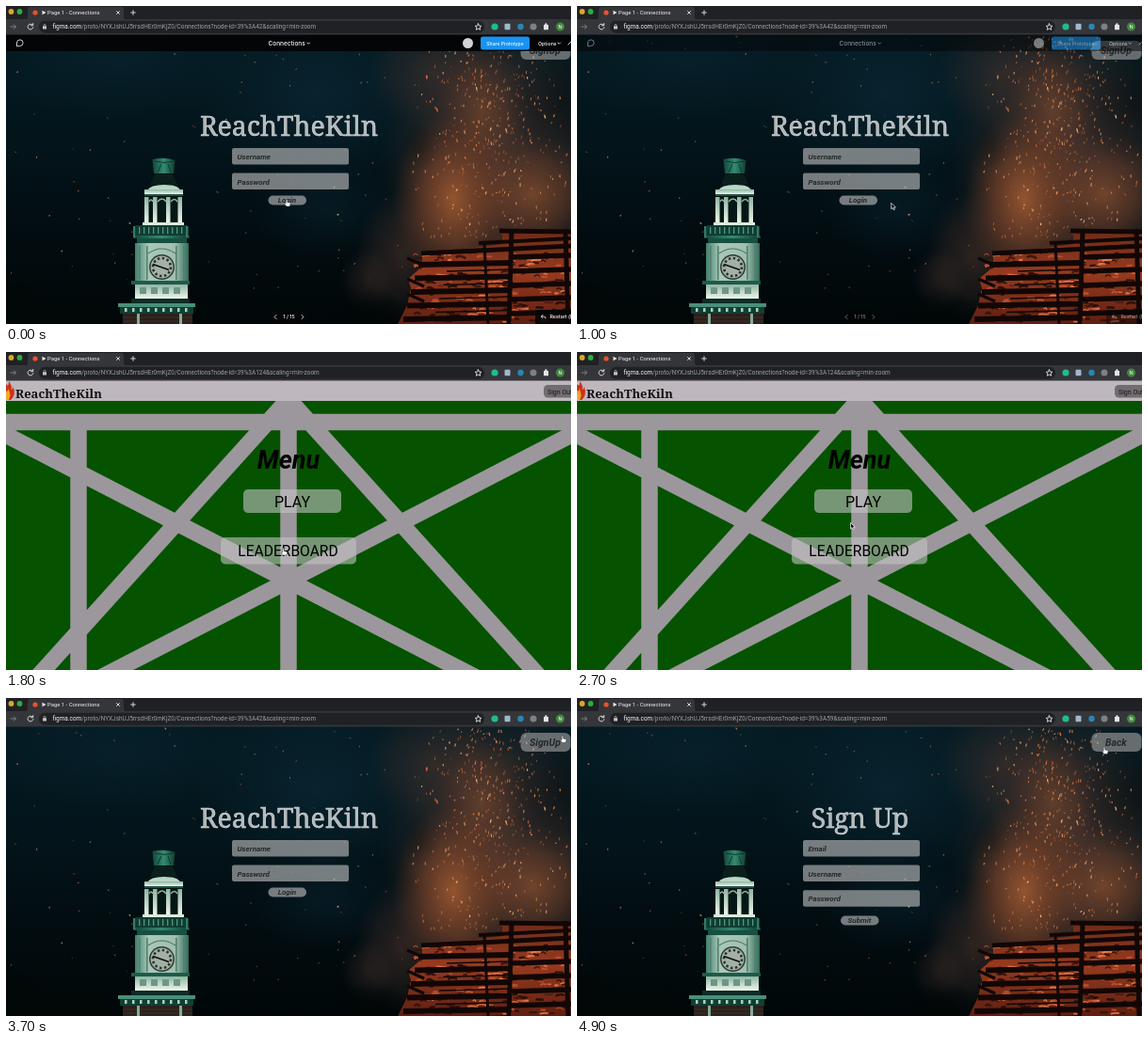
Animation, 600 px wide and 338 px high, one loop 5000 ms. Source, as an HTML page:

```html
<!DOCTYPE html>
<html lang="en">
<head>
<meta charset="utf-8">
<title>Prototype walkthrough</title>
<style>
  html, body { margin: 0; width: 100%; height: 100%; overflow: hidden; background: #000; }
  svg { display: block; width: 100vw; height: 100vh; }
  text { font-family: Roboto, sans-serif; }
  .title { font: 400 28.5px "Noto Serif", serif; fill: #ffffffb0; stroke: #f2f4f2; stroke-width: .45; text-anchor: middle; }
  .bi { font-weight: 700; font-style: italic; fill: #262829; }
  .mid { text-anchor: middle; }
  .box { fill: #c4c4c4; fill-opacity: .6; }
  .corner { fill: #b4b4b4; fill-opacity: .54; }
  .bar { font: 500 6px Inter, sans-serif; fill: #fff; }
  .line { fill: none; stroke: #e4e6e8; stroke-width: .9; stroke-linecap: round; stroke-linejoin: round; }
</style>
</head>
<body>
<svg viewBox="0 0 600 338" preserveAspectRatio="none">
  <defs>
    <linearGradient id="sky" x2="0" y2="1">
      <stop offset="0" stop-color="#041a22"/><stop offset=".4" stop-color="#03141a"/>
      <stop offset=".7" stop-color="#020c10"/><stop offset="1" stop-color="#010708"/>
    </linearGradient>
    <radialGradient id="haze">
      <stop offset="0" stop-color="#0d2f40" stop-opacity=".7"/><stop offset="1" stop-color="#0d2f40" stop-opacity="0"/>
    </radialGradient>
    <radialGradient id="ember">
      <stop offset="0" stop-color="#a05a30" stop-opacity=".9"/><stop offset=".5" stop-color="#84472a" stop-opacity=".55"/>
      <stop offset="1" stop-color="#60341f" stop-opacity="0"/>
    </radialGradient>
    <radialGradient id="smoke">
      <stop offset="0" stop-color="#553a31" stop-opacity=".85"/><stop offset=".6" stop-color="#44322e" stop-opacity=".5"/>
      <stop offset="1" stop-color="#2a2828" stop-opacity="0"/>
    </radialGradient>
    <radialGradient id="dark">
      <stop offset="0" stop-color="#020607" stop-opacity=".8"/><stop offset="1" stop-color="#020607" stop-opacity="0"/>
    </radialGradient>
    <linearGradient id="fire" x2="0" y2="1">
      <stop offset="0" stop-color="#6e2c18"/><stop offset=".45" stop-color="#963a1f"/><stop offset="1" stop-color="#5e1f11"/>
    </linearGradient>
    <linearGradient id="stone">
      <stop offset="0" stop-color="#3f7f6b"/><stop offset=".25" stop-color="#a9c8b8"/>
      <stop offset=".75" stop-color="#a0bfaf"/><stop offset="1" stop-color="#2f6b58"/>
    </linearGradient>
    <linearGradient id="copper">
      <stop offset="0" stop-color="#12473a"/><stop offset=".5" stop-color="#348a70"/><stop offset="1" stop-color="#103e32"/>
    </linearGradient>
    <linearGradient id="uplight" x2="0" y2="1">
      <stop offset="0" stop-color="#8fb5a3"/><stop offset="1" stop-color="#eef6ea"/>
    </linearGradient>
  </defs>

  <g id="night">
    <rect y="30" width="600" height="308" fill="url(#sky)"/>
    <ellipse cx="120" cy="60" rx="150" ry="60" fill="url(#haze)" opacity=".45"/>
    <ellipse cx="330" cy="95" rx="130" ry="95" fill="url(#haze)" opacity=".7"/>
    <ellipse cx="340" cy="215" rx="80" ry="55" fill="url(#haze)" opacity=".5"/>
    <g id="puffs"></g>
    <path d="M0 300Q15 287 28 303T60 318T95 311L125 338H0Z" fill="#020708"/>
    <g id="sparks" fill="none" stroke-linecap="round"></g>
    <g id="tower"></g>
    <g id="pyre"></g>
  </g>

  <g id="login">
    <text class="title" x="300.5" y="137.5">ReachTheKiln</text>
    <g id="loginForm"></g>
  </g>
  <g id="signup">
    <text class="title" x="300.5" y="137.5">Sign Up</text>
    <g id="signupForm"></g>
  </g>

  <g id="menu">
    <rect y="30" width="600" height="308" fill="#055300"/>
    <path d="M0 74.5H600M77 75V338M300 45V338M300 50L31 348M300 50L569 348M-10 83L510 351.500M610 83L90 351.500"
      fill="none" stroke="#9c979c" stroke-width="17.500"/>
    <rect y="30" width="600" height="22" fill="#beb8be"/>
    <path d="M0 51V34Q3 38 3 31Q7 36 5.500 40Q8 39 7.500 36Q11 46 5 51Z" fill="#cf2f17"/>
    <path d="M0 51V41Q2 43 2.500 39Q6 46 3 51Z" fill="#f6a426"/>
    <text x="10" y="49" style="font:700 13px 'Noto Serif',serif" fill="#111">ReachTheKiln</text>
    <rect x="571" y="35" width="40" height="13.500" rx="4.500" fill="#706c70"/>
    <text x="575" y="44.500" font-size="7" fill="#171717">Sign Out</text>
    <text class="mid" x="300" y="124" font-size="27" font-weight="700" font-style="italic">Menu</text>
    <rect class="box" x="252" y="146" width="104" height="25" rx="5"/>
    <text class="mid" x="304" y="164.500" font-size="16">PLAY</text>
    <rect class="box" x="228" y="197" width="144" height="28.500" rx="5"/>
    <text class="mid" x="299.500" y="217" font-size="15.600">LEADERBOARD</text>
  </g>

  <g id="tools">
    <rect y="30" width="600" height="18" fill="#040506"/>
    <path class="line" d="M11.500 42.500V39A3.300 3.300 0 1 1 14.800 42.500Z"/>
    <text class="bar" x="278.500" y="41.800" style="font-size:6.500px">Connections</text>
    <path class="line" d="M320 39l1.300 1.300l1.300-1.300M586 39l1.300 1.300l1.300-1.300"/>
    <circle cx="490.500" cy="39.500" r="5.500" fill="#d2d4d5"/>
    <rect x="504" y="32.500" width="52" height="14" rx="2.500" fill="#1893f2"/>
    <text class="bar mid" x="530" y="41.600" style="font-size:5.100px">Share Prototype</text>
    <text class="bar" x="565" y="41.600" style="font-size:5.300px">Options</text>
    <path class="line" d="M597 41l3-3"/>
    <rect x="283" y="323" width="36" height="18" rx="2" fill="#050607" fill-opacity=".9"/>
    <path class="line" d="M287 328.500l-2 2l2 2M314 328.500l2 2l-2 2"/>
    <text class="bar mid" x="300.500" y="332.300" style="font-size:5.300px">1 / 15</text>
    <rect x="562" y="323" width="40" height="18" rx="2" fill="#050607" fill-opacity=".9"/>
    <path class="line" d="M570 328.500l-1.700 1.500l1.700 1.500M568.500 330h3q1.500 0 1.500 2"/>
    <text class="bar" x="577.500" y="332.300" style="font-size:5.300px">Restart (R)</text>
  </g>

  <g id="chrome">
    <rect width="600" height="15" fill="#202124"/>
    <path d="M20 15Q23 14 23 11V4Q23 1 26 1H122Q125 1 125 4V11Q125 14 128 15Z" fill="#35363a"/>
    <rect y="14" width="600" height="16.500" fill="#35363a"/>
    <circle cx="5.500" cy="6" r="2.900" fill="#dca52b"/>
    <circle cx="14.500" cy="6" r="2.900" fill="#2bae3e"/>
    <circle cx="31" cy="7" r="2.600" fill="#f0502b"/>
    <path d="M38.500 4.700l4 2.300l-4 2.300Z" fill="#eee"/>
    <text x="44" y="9.300" font-size="5.900" fill="#f0f1f2">Page 1 - Connections</text>
    <path class="line" d="M117.500 5.500l3 3m0-3l-3 3M132.700 7h4.600M135 4.700v4.600"/>
    <path d="M4.500 22h6m-2.500-2.500l2.500 2.500l-2.500 2.500" fill="none" stroke="#85878a" stroke-width=".9"/>
    <path class="line" d="M28.300 20.200A2.900 2.900 0 1 0 28.900 22.600M28.700 18.500V20.700H26.500"/>
    <rect x="35" y="15.700" width="473" height="13" rx="6.500" fill="#202124"/>
    <rect x="39" y="21.300" width="4" height="3.300" rx=".4" fill="#c3c5c8"/>
    <path d="M39.900 21.500v-1a1.100 1.100 0 0 1 2.200 0v1" fill="none" stroke="#c3c5c8" stroke-width=".7"/>
    <text x="49.500" y="24.300" font-size="6.450" fill="#9aa0a6"><tspan fill="#f2f3f4">figma.com</tspan>/proto/NYXJshUJ5rrsdHEr0mKjZ0/Connections?node-id=39%3A<tspan id="node">42</tspan>&amp;scaling=min-zoom</text>
    <path class="line" d="M501.500 18.800l1 2.200l2.400.3l-1.800 1.600l.5 2.400l-2.100-1.200l-2.100 1.200l.5-2.400l-1.800-1.600l2.400-.3Z"/>
    <circle cx="519" cy="22" r="3.600" fill="#1ebd8c"/>
    <rect x="529.500" y="18.800" width="6" height="6.400" rx="1" fill="#9db9cf"/>
    <circle cx="546.500" cy="22" r="3.200" fill="#2a86b5"/>
    <circle cx="560" cy="22" r="3.500" fill="#7d8084"/>
    <path d="M571 20h1.300a1.200 1.200 0 1 1 2.200 0h1.500v5.300H571Z" fill="#e2e4e6"/>
    <circle cx="588.500" cy="22" r="4.500" fill="#3f8b3b"/>
    <text class="mid" x="588.500" y="24.100" font-size="5.800" fill="#fff">N</text>
  </g>

  <g id="cursor">
    <path id="arrow" d="M0 0V6.400L1.500 5.100L2.500 7.400L3.700 6.900L2.700 4.700H4.700Z" fill="#080808" stroke="#fff" stroke-width=".7"/>
    <path id="hand" d="M-.8.4Q0-.5.7.4V3L3.600 3.700Q4.200 4 4 5L3.300 7.500H-.2L-2.400 4.800Q-2 4 -.8 4.600Z" fill="#fff" stroke="#222" stroke-width=".45"/>
  </g>
</svg>

<script>
const $ = id => document.getElementById(id);
const rect = (x, y, w, h, fill, more = '') =>
  `<rect x="${x}" y="${y}" width="${w}" height="${h}" fill="${fill}" ${more}/>`;
const path = (d, stroke, w = 1, more = '') =>
  `<path d="${d}" fill="none" stroke="${stroke}" stroke-width="${w}" ${more}/>`;
const puff = (x, y, rx, ry, tone, opacity = 1) =>
  `<ellipse cx="${x}" cy="${y}" rx="${rx}" ry="${ry}" fill="url(#${tone})" opacity="${opacity}"/>`;

let seed = 41;
function rnd() {
  seed = (seed * 16807) % 2147483647;
  return seed / 2147483647;
}
const between = (a, b) => +(a + rnd() * (b - a)).toFixed(1);

function puffs() {
  return puff(520, 170, 125, 175, 'smoke', .9) + puff(455, 70, 75, 65, 'smoke', .55) +
    puff(420, 265, 50, 70, 'smoke', .6) + puff(385, 290, 30, 35, 'smoke', .4) +
    puff(475, 205, 65, 95, 'ember') + puff(560, 200, 75, 65, 'ember', .65) +
    puff(505, 110, 50, 75, 'ember', .5) + puff(590, 105, 60, 65, 'dark', .5) +
    puff(440, 150, 22, 28, 'dark', .3) + puff(385, 335, 50, 35, 'dark');
}

// Sparks: dense above the pyre, sparse elsewhere
function sparks() {
  const tones = ['#ec8a4c', '#d0703e', '#f7b47a', '#c06034'];
  let out = '';
  for (let i = 0; i < 520; i++) {
    const far = i < 80;
    const y = between(32, far ? 300 : 246);
    const x = far ? between(0, 430) : (512 + (rnd() + rnd() - 1) * (75 + y * .08)).toFixed(1);
    const d = `M${x} ${y}l${between(-.9, .7)} ${between(.3, far ? .9 : 2.8)}`;
    out += path(d, tones[i % 4], between(.7, 1.4), `opacity="${between(.4, far ? .8 : 1)}"`);
  }
  return out;
}

function tower() {
  const stone = 'url(#stone)', copper = 'url(#copper)', lit = 'url(#uplight)';
  let s = '<path d="M155.500 163Q168 160 179.500 164L178 178H157Z" fill="url(#copper)"/>';
  s += path('M158 165q10 3 20 0M161 177l4-9M175 177l-3-9', '#0b3a2f');
  s += '<path d="M158 179H177L182 190H153Z" fill="#0a1f1c"/>';
  s += '<path d="M150 196Q153 190 168 190T185 196Z" fill="#b9d6c6"/>';
  s += rect(147, 195, 41, 5, lit) + rect(147, 200, 41, 2, '#1d5444');
  s += rect(148, 202, 39, 30, '#061614');
  for (const x of [147, 156, 170, 182.5]) s += rect(x, 203, 4.5, 28, lit);
  s += path('M152 208q2-4 4 0M161 208q5-6 9 0M175 208q4-5 7 0', '#8fb3a2', 1.5);
  s += rect(145, 230, 44, 3, '#dcebdc') + rect(138, 233, 54, 11, '#0f3d32');
  for (let x = 141; x < 191; x += 5) s += rect(x, 235, 1.3, 7, '#4f9780');
  s += rect(135, 244, 60, 3, copper) + rect(135, 234, 2.5, 12, '#2f7d67') + rect(191, 234, 2.5, 12, '#2f7d67');
  s += rect(139, 247, 53, 6, '#174f41') + rect(137, 252, 57, 41, stone);
  for (const x of [141, 149, 180, 188]) s += rect(x, 255, 1.6, 36, '#54806f');
  s += path('M151 263q14-10 29 0', '#4d7665', 1.2);
  s += '<circle cx="165.500" cy="277.500" r="13.500" fill="#2a3a34"/><circle cx="165.500" cy="277.500" r="12" fill="#a3b0a4"/>';
  s += '<circle cx="165.500" cy="277.500" r="9.500" fill="none" stroke="#26322d" stroke-width="2.600" stroke-dasharray="2.400 2.575"/>';
  s += path('M156 274.500L166 278L173 280.500', '#0c1110', 1.5);
  s += rect(133, 292, 62, 4, '#1d5b4a') + rect(137, 296, 56, 15, lit);
  for (let x = 142; x < 190; x += 12) s += rect(x, 299, 7, 7, '#6f9585');
  s += rect(133, 311, 62, 5, '#0c2c25') + rect(119, 316, 82, 4, '#4a8f79') + rect(121, 320, 78, 7, '#123f33');
  s += rect(124, 327, 74, 11, '#2b211d');
  for (let x = 126; x < 196; x += 8) s += rect(x, 321, 2.5, 4, '#a9d2c0');
  return s + path('M124 331H198M124 335H198', '#48332b', .7) + rect(139, 327, 3, 11, '#83ab99') + rect(184, 327, 3, 11, '#83ab99');
}

function pyre() {
  let s = '<path d="M416 338L426 318L430 300L427 290L442 277V264L527 253V240H600V338Z" fill="url(#fire)"/>';
  for (let i = 0; i < 210; i++) {
    const d = `M${between(432, 594)} ${between(262, 336)}q${between(2, 5)} ${between(-4, 1)} ${between(3, 11)} ${between(-1, 1)}`;
    s += path(d, ['#f08050', '#30100a', '#c4532c', '#1c0a07'][i % 4], between(1, 2.6), 'opacity=".85"');
  }
  const beam = (x1, y1, x2, y2, w = 4) => path(`M${x1} ${y1}L${x2} ${y2}`, '#120706', w);
  s += beam(524, 239, 600, 240, 5) + beam(502, 252, 600, 247) + beam(441, 263, 600, 255, 5);
  for (let i = 0; i < 5; i++) {
    const y = 275 + i * 14.5, left = 438 - i * 4;
    s += beam(left, y, 535, y - 2, 6) + beam(535, 267 + i * 15, 600, 265 + i * 15, 5.5);
    s += beam(left + 30, y + 7, 535, y + 5, 1.5);
  }
  for (const y of [268, 290, 306]) s += beam(426, y, 444, y + 8, 3.5);
  return s + beam(537, 238, 534, 338, 5) + beam(594, 237, 597, 338, 5) + beam(508, 252, 512, 338, 3);
}

function form(fields, button, x, y, corner, cornerX) {
  const rows = fields.map((name, i) => {
    const top = 151 + i * 26.6;
    return `<rect class="box" x="240" y="${top}" width="124" height="17.500" rx="2"/>
      <text class="bi" x="245.500" y="${top + 12.2}" font-size="8">${name}</text>`;
  }).join('');
  return rows + `<rect class="box" x="${x}" y="${y}" width="40.500" height="10" rx="5"/>
    <text class="bi mid" x="${x + 20}" y="${y + 7.5}" font-size="8">${button}</text>
    <rect class="corner" x="546.500" y="37" width="53" height="20" rx="6"/>
    <text class="bi" x="${cornerX}" y="50.500" font-size="10.500">${corner}</text>`;
}

$('puffs').innerHTML = puffs();
$('sparks').innerHTML = sparks();
$('tower').innerHTML = tower();
$('pyre').innerHTML = pyre();
$('loginForm').innerHTML = form(['Username', 'Password'], 'Login', 278.5, 201.5, 'SignUp', 556);
$('signupForm').innerHTML = form(['Email', 'Username', 'Password'], 'Submit', 280, 231.5, 'Back', 561);

const LOOP = 5000, STEP = 100;
const pages = [[0, 'login', '42'], [1600, 'menu', '124'], [3700, 'login', '42'], [4900, 'signup', '59']];
// time, x, y of the pointer tip
const route = [
  [0, 298, 205.5], [100, 298, 205.5], [600, 341, 209.5], [900, 341, 209.5], [1300, 294.5, 208.5],
  [2000, 294.5, 208.5], [2600, 290.5, 181.5], [2800, 290.5, 181.5], [3500, 591, 40],
  [3800, 591, 40], [4300, 530, 69.5], [4400, 530, 69.5], [4800, 560, 52], [5000, 560, 52]
];
// x1, y1, x2, y2 of clickable areas
const links = {
  login: [[278, 201, 320, 212], [546, 37, 600, 57]],
  signup: [[280, 231, 321, 242], [546, 37, 600, 57]],
  menu: [[252, 146, 356, 171], [228, 197, 372, 226], [571, 35, 600, 49]]
};

const ease = p => p * p * (3 - 2 * p);
const show = (id, on) => $(id).style.display = on ? '' : 'none';

function pointer(t) {
  const i = route.findIndex(k => k[0] > t);
  const [t0, x0, y0] = route[i - 1], [t1, x1, y1] = route[i];
  const p = ease((t - t0) / (t1 - t0));
  return [x0 + (x1 - x0) * p, y0 + (y1 - y0) * p];
}

function draw(t) {
  const [, page, node] = pages.filter(p => p[0] <= t).pop();
  for (const id of ['login', 'menu', 'signup']) show(id, id === page);
  show('night', page !== 'menu');
  $('node').textContent = node;
  $('tools').style.opacity = Math.max(0, Math.min(1, (1100 - t) / 200));
  const [x, y] = pointer(t);
  const over = links[page].some(b => x >= b[0] && y >= b[1] && x <= b[2] && y <= b[3]);
  show('hand', over);
  show('arrow', !over);
  $('cursor').setAttribute('transform', `translate(${x.toFixed(2)} ${y.toFixed(2)})`);
}

const start = performance.now();
let last = -1;
function tick() {
  const t = Math.floor((performance.now() - start) % LOOP / STEP) * STEP;
  if (t !== last) draw(last = t);
  requestAnimationFrame(tick);
}
tick();
</script>
</body>
</html>
```
